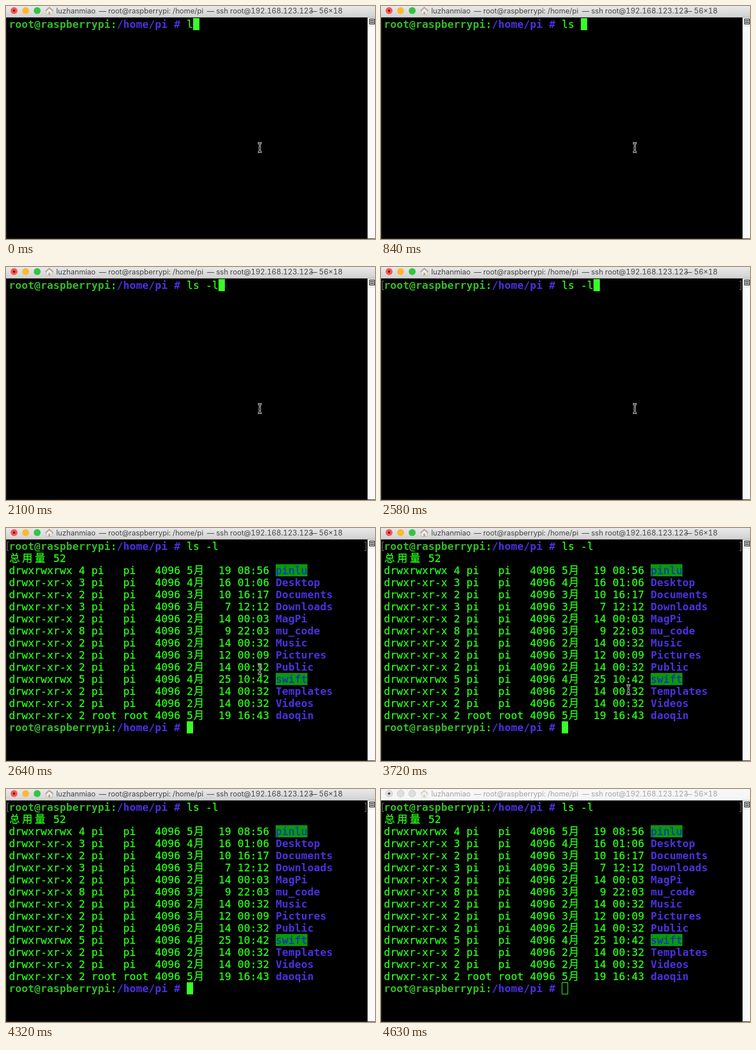
Recreate the animation shown at these times as an HTML page. Size 639 by 405 pixels, loop 4.67 s.

```html
<!DOCTYPE html>
<html lang="zh">
<head>
<meta charset="utf-8">
<title>Terminal</title>
<style>
  html, body { margin: 0; width: 100%; height: 100%; overflow: hidden; background: #000; }
  .stage { position: relative; width: 639px; height: 405px; overflow: hidden; background: #000; }
  .stage::after {
    content: ""; position: absolute; inset: 20px 0 0 0;
    border: solid #2b302c; border-width: 0 0 1px 1px;
  }
  .bar, .bar *, .row, .cursor, .mark, .beam, .scroll { position: absolute; }
  .bar, .typed, .cursor, .mark, .list, .beam { animation: 4670ms step-end infinite; }

  /* title bar */
  .bar {
    left: 0; top: 0; width: 639px; height: 19px;
    border-bottom: 1px solid var(--edge);
    background: linear-gradient(var(--top), var(--low));
    color: var(--ink);
    font: 12.6px/16px Inter, "Open Sans", sans-serif;
    font-variant-numeric: tabular-nums;
    white-space: pre;
    animation-name: focus;
  }
  .bar span { top: 1px; }
  .bar svg { left: 0; top: 0; }
  @keyframes focus {
    0% {
      --top: #e9e9e9; --low: #d2d2d2; --edge: #b4b4b4; --ink: #454545;
      --red: #fc5652; --amber: #fdb92f; --green: #31c544; --rim: transparent;
      --dot: #6a0d08; --house: 1;
    }
    99.143%, 100% {
      --top: #f7f7f7; --low: #f5f5f5; --edge: #d4d4d4; --ink: #a5a5a5;
      --red: #dedede; --amber: #dedede; --green: #dedede; --rim: #cacaca;
      --dot: #444; --house: .5;
    }
  }

  /* terminal text: cells of 11 by 21 px */
  .row, .typed {
    font: 18px/21px "DejaVu Sans Mono", monospace;
    letter-spacing: calc(11px - 1ch);
    white-space: pre; color: #28fe14;
    -webkit-text-stroke: .3px;
  }
  .row { left: 5px; height: 21px; }
  .row i {
    display: inline-block; width: 22px; line-height: 0; font-style: normal;
    font-family: "Noto Sans CJK SC", "Noto Sans CJK", sans-serif; text-indent: 1px; letter-spacing: 0;
  }
  .row b { color: #34bb25; -webkit-text-stroke: 0; }
  .row b.dir { color: #4a31e0; }
  .row .open { display: inline-block; height: 21px; background: #0a980b; color: #1430c4; }

  .typed { display: inline-block; vertical-align: top; overflow: hidden; height: 21px; animation-name: type; }
  @keyframes type {
    0% { width: 11px; }
    10.278% { width: 22px; }
    17.987% { width: 33px; }
    29.55% { width: 44px; }
    44.967%, 100% { width: 55px; }
  }

  .cursor { width: 11px; height: 21px; background: #38fe27; animation-name: cursor; }
  @keyframes cursor {
    0% { left: 324px; top: 21px; }
    10.278% { left: 335px; top: 21px; }
    17.987% { left: 346px; top: 21px; }
    29.55% { left: 357px; top: 21px; }
    44.967% { left: 368px; top: 21px; }
    56.531% { left: 313px; top: 336px; }
    0%, 92.505% { opacity: 1; }
    80.942% { opacity: 0; }
    0% { background: #38fe27; box-shadow: none; }
    99.143%, 100% {
      left: 313px; top: 336px; opacity: 1;
      background: transparent; box-shadow: inset 0 0 0 1px #38fe27;
    }
  }

  .mark {
    left: 2px; top: 24px; width: 2px; height: 14px;
    border: 1px solid #777; border-right: 0; animation-name: mark;
  }
  .mark.end { left: 621px; transform: scaleX(-1); }
  @keyframes mark { 0% { visibility: hidden; } 55.246%, 100% { visibility: visible; } }

  .list { animation-name: list; }
  @keyframes list { 0% { visibility: hidden; } 56.531%, 100% { visibility: visible; } }

  /* mouse pointer */
  .beam { left: 434px; top: 236px; animation-name: beam; }
  .beam path { stroke: #e8e8e8; stroke-width: 3; }
  .beam path + path { stroke: #000; stroke-width: 1.2; }
  @keyframes beam {
    0% { transform: none; visibility: visible; }
    79.657% { transform: translate(-11px, 35px); visibility: visible; }
    80.942%, 100% { transform: translate(-11px, 35px); visibility: hidden; }
  }

  .scroll { left: 626px; top: 20px; }
</style>
</head>
<body>
<div class="stage">
  <div class="bar">
    <svg width="90" height="19">
      <g style="stroke: var(--rim)">
        <circle cx="14" cy="8" r="6" style="fill: var(--red)"/>
        <circle cx="34" cy="8" r="6" style="fill: var(--amber)"/>
        <circle cx="54" cy="8" r="6" style="fill: var(--green)"/>
      </g>
      <circle cx="14" cy="8" r="2" style="fill: var(--dot)"/>
      <g style="opacity: var(--house)">
        <path d="M70 8L75 3.500L80 8V14.500H70Z" fill="#f0ece6" stroke="#bdb5ad" stroke-width=".8"/>
        <path d="M68.500 8.500L75 2.500L81.500 8.500" fill="none" stroke="#b3a096" stroke-width="1.800"/>
        <path d="M73.500 14.500V10H76.500V14.500Z" fill="#b99f86"/>
      </g>
    </svg>
    <span style="left:87px">luzhanmiao</span>
    <span style="left:161px">— root@raspberrypi: /home/pi</span>
    <span style="left:348px">— ssh root@192.168.123.123</span>
    <span style="left:526px">— 56×18</span>
  </div>

  <div class="row" style="top:21px"><b>root@raspberrypi</b>:<b class="dir">/home/pi #</b> <span class="typed">ls -l</span></div>
  <div class="mark"></div>
  <div class="mark end"></div>
  <div class="list"></div>
  <div class="cursor"></div>

  <svg class="scroll" width="13" height="385">
    <path d="M0 0H13V385H0Z" fill="#fafafa"/>
    <path d="M0 .5H13M0 14.500H13M.5 0V385" stroke="#d6d6d6"/>
    <path d="M3.500 2.500H12.500V11.500H3.500Z" fill="#bbb" stroke="#222"/>
    <path d="M5 5.500H11M5 8.500H11" stroke="#222"/>
  </svg>

  <svg class="beam" width="11" height="20" fill="none">
    <path d="M2 2Q5.500 2 5.500 5V15Q5.500 18 2 18M9 2Q5.500 2 5.500 5M9 18Q5.500 18 5.500 15M3.500 11H7.500"/>
    <path d="M2 2Q5.500 2 5.500 5V15Q5.500 18 2 18M9 2Q5.500 2 5.500 5M9 18Q5.500 18 5.500 15M3.500 11H7.500"/>
  </svg>
</div>
<script>
  // links, month, day, time, name
  const files = `4 5 19 08:56 pinlu
3 4 16 01:06 Desktop
2 3 10 16:17 Documents
3 3 7 12:12 Downloads
2 2 14 00:03 MagPi
8 3 9 22:03 mu_code
2 2 14 00:32 Music
2 3 12 00:09 Pictures
2 2 14 00:32 Public
5 4 25 10:42 swift
2 2 14 00:32 Templates
2 2 14 00:32 Videos
2 5 19 16:43 daoqin`.split("\n").map(line => line.split(" "));

  const shared = ["pinlu", "swift"];
  const wide = text => [...text].map(c => `<i>${c}</i>`).join("");

  function fileRow([links, month, day, time, name]) {
    const open = shared.includes(name);
    const owner = (name === "daoqin" ? "root" : "pi").padEnd(4);
    const label = open ? `<span class="open">${name}</span>` : `<b class="dir">${name}</b>`;
    return `${open ? "drwxrwxrwx" : "drwxr-xr-x"} ${links} ${owner} ${owner} 4096 ` +
      `${month}${wide("月")}  ${day.padStart(2)} ${time} ${label}`;
  }

  const rows = [
    wide("总用量") + " 52",
    ...files.map(fileRow),
    '<b>root@raspberrypi</b>:<b class="dir">/home/pi #</b>'
  ];
  document.querySelector(".list").innerHTML = rows
    .map((html, i) => `<div class="row" style="top:${42 + i * 21}px">${html}</div>`)
    .join("");
</script>
</body>
</html>
```
